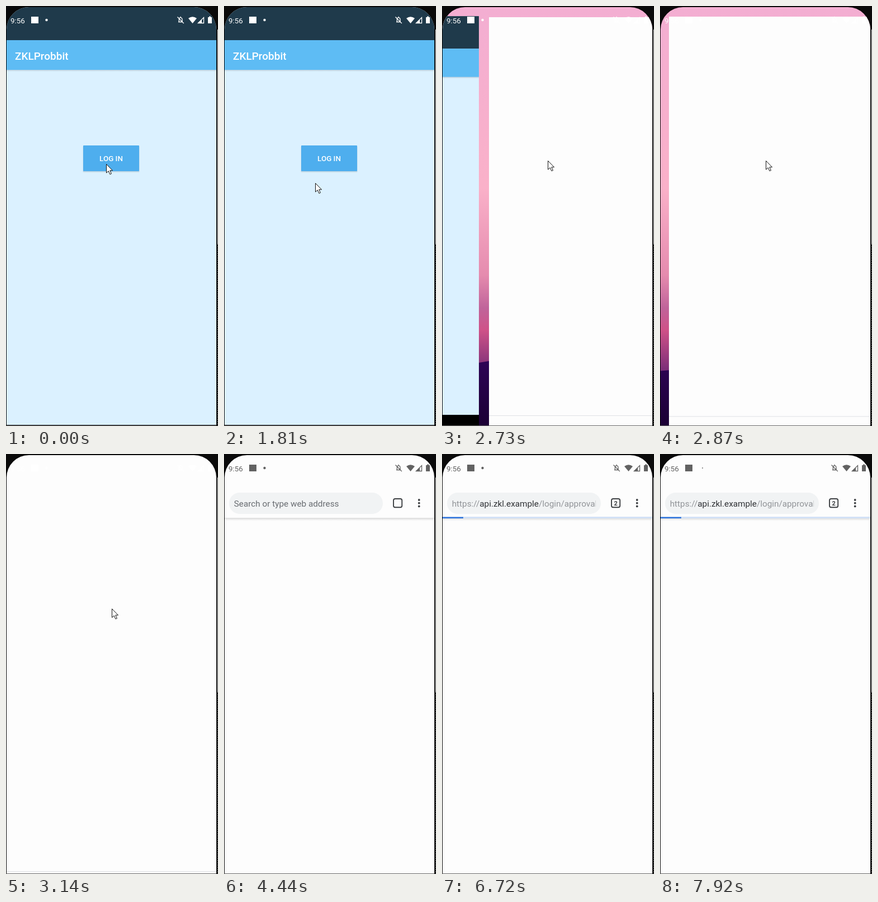
Recreate the animation shown at these times as an HTML page. Size 379 px wide and 750 px high, loop 8 s.

```html
<!DOCTYPE html>
<html lang="en">
<head>
<meta charset="utf-8">
<title>Log in</title>
<style>
  html, body { margin: 0; width: 100%; height: 100%; overflow: hidden; background: #000; }
  svg { display: block; width: 100vw; height: 100vh; font-family: Roboto, sans-serif; }
  .medium { font-weight: 500; fill: #fff; }
</style>
</head>
<body>
<svg viewBox="0 0 379 750" preserveAspectRatio="none">
  <defs>
    <clipPath id="phone"><path d="M1 749V42A40 40 0 0 1 41 2H336A40 40 0 0 1 376 42V749Z"/></clipPath>
    <clipPath id="field"><rect x="9" y="69" width="266" height="38"/></clipPath>
    <linearGradient id="sky" gradientUnits="userSpaceOnUse" x1="0" y1="0" x2="0" y2="650">
      <stop offset="0" stop-color="#f3aed2"/>
      <stop offset=".5" stop-color="#fab1c9"/>
      <stop offset=".74" stop-color="#e58bae"/>
      <stop offset=".83" stop-color="#c0649a"/>
      <stop offset=".89" stop-color="#cf5288"/>
      <stop offset="1" stop-color="#7c2f78"/>
    </linearGradient>
    <linearGradient id="ground" x1="0" y1="0" x2="0" y2="1">
      <stop offset="0" stop-color="#30045a"/>
      <stop offset="1" stop-color="#1b0034"/>
    </linearGradient>
    <linearGradient id="shade" x1="0" y1="0" x2="0" y2="1">
      <stop offset="0" stop-color="#000" stop-opacity=".14"/>
      <stop offset="1" stop-color="#000" stop-opacity=".01"/>
    </linearGradient>
  </defs>

  <rect width="379" height="750" fill="#0a0a0a"/>
  <path d="M378.500 42V425" stroke="#e4e4e4"/>
  <path d="M378.500 425V750" stroke="#777" stroke-dasharray="2 2"/>
  <rect y="749" width="376" height="1" fill="#666"/>

  <g clip-path="url(#phone)">
    <g id="wall">
      <rect width="377" height="750" fill="url(#sky)"/>
      <path d="M0 651.500L20 650L66 637L84 634L377 620V750H0Z" fill="url(#ground)"/>
      <rect id="gap" y="730" width="66" height="20" fill="#000"/>
    </g>

    <g id="app">
      <rect width="376" height="748" fill="#dbf1ff"/>
      <rect y="748" width="376" height="1" fill="#0a0a0a"/>
      <rect width="376" height="61" fill="#1f3a4b"/>
      <rect y="61" width="376" height="53" fill="#5ebcf4"/>
      <rect y="114" width="376" height="3" fill="url(#shade)"/>
      <text class="medium" x="16" y="95.500" font-size="19">ZKLProbbit</text>
      <rect x="137.500" y="250" width="101" height="47" rx="1.500" opacity=".1"/>
      <rect x="138" y="249" width="100" height="46" rx="1" fill="#4eaeee"/>
      <text class="medium" x="188" y="277.300" font-size="13.400" text-anchor="middle">LOG IN</text>
    </g>

    <g id="page">
      <rect id="sheet" width="377" height="750" fill="#fdfdfd"/>
      <rect id="rule" width="377" height="1" fill="#dfe2e5"/>
    </g>

    <g id="bar">
      <rect y="114" width="376" height="5" fill="url(#shade)"/>
      <rect x="9" y="69" width="275" height="38" rx="19" fill="#f1f3f4"/>
      <g clip-path="url(#field)" font-size="15.300">
        <text id="hint" x="17.700" y="94" fill="#686c71">Search or type web address</text>
        <text id="link" x="17.700" y="94" fill="#919498">https://<tspan fill="#303236">api.zkl.example</tspan>/login/approval</text>
      </g>
      <rect x="303" y="80" width="15.200" height="15.200" rx="3" fill="none" stroke="#3d4043" stroke-width="1.900"/>
      <text id="tabs" x="310.600" y="91.700" font-size="11" font-weight="700" text-anchor="middle" fill="#3d4043">2</text>
      <g fill="#3d4043">
        <circle cx="348.700" cy="82" r="1.900"/><circle cx="348.700" cy="87.700" r="1.900"/><circle cx="348.700" cy="93.400" r="1.900"/>
      </g>
      <g id="load">
        <rect y="112" width="376" height="3" fill="#d2e1f6"/>
        <rect y="112.500" width="38" height="2.500" fill="#2f74dc"/>
      </g>
    </g>

    <g id="status">
      <text x="8" y="30.500" font-size="13.400">9:56</text>
      <rect x="45" y="19" width="13" height="12"/>
      <circle id="dot"/>
      <g fill="none" stroke="currentColor" stroke-width="1.300">
        <path d="M308 28.500H316M309.300 28V24.500Q309.300 21 312 20.700Q315 21 315 24.500V28M312 18.800V20.500M306.500 19.500L317.800 31"/>
        <path d="M343.500 30.500L353.500 20.500V30.500Z"/>
      </g>
      <path d="M326 22Q333.500 16.500 341 22L333.500 31Z"/>
      <path d="M343 31L350 24V31Z"/>
      <path d="M361 20H363V18.500H366V20H368V31H361Z"/>
    </g>
  </g>

  <path id="cursor" d="M.5.500V16L4.200 12.700L6.900 18.600L9.400 17.500L6.800 11.800H11.500Z" fill="#fff" stroke="#111" stroke-linejoin="round"/>
</svg>
<script>
const LOOP = 8000;
const el = id => document.getElementById(id);
const set = (id, attrs) => {
  for (const key in attrs) el(id).setAttribute(key, attrs[key]);
};
const show = (id, on) => set(id, { visibility: on ? 'visible' : 'hidden' });

// Each row: start time, then the values held from there.
const pointer = [
  [0, 179, 282], [120, 177, 276], [270, 179, 270], [400, 181, 266],
  [1810, 163, 316], [1930, 139, 381], [2080, 132, 432], [2200, 179, 361],
  [2350, 194, 302], [2480, 189, 276]
];
const slide = [[0, 377, 20, 731], [2730, 84, 20, 731], [2870, 16, 19, 732.5], [2990, 1, 4, 745], [3140, 0, 0, 745]];
const fade = [[0, 0], [3810, .25], [3930, .55], [4050, .85], [4190, 1]];

const held = (rows, t) => rows.filter(row => row[0] <= t).pop().slice(1);

function render(t) {
  const moving = t >= 2730;
  const loaded = t >= 6600;
  const [px, py] = held(pointer, t);
  const [x, top, line] = held(slide, t);
  const [alpha] = held(fade, t);

  show('wall', moving && t < 3140);
  show('gap', moving && t < 2870);
  show('app', t < 2870);
  set('app', { transform: moving ? 'translate(-292 18.1) scale(.952)' : '' });

  show('page', moving);
  set('sheet', { x, y: top });
  set('rule', { x, y: line, opacity: 1 - alpha });

  set('bar', { opacity: alpha });
  show('hint', !loaded);
  show('link', loaded);
  show('tabs', loaded);
  show('load', t >= 6720);

  const ink = t >= 4440 ? '#626262' : '#fff';
  set('status', { fill: ink, color: ink });
  set('dot', t >= 7920 ? { cx: 76, cy: 25, r: .9 } : { cx: 72.5, cy: 25, r: 2.2 });

  show('cursor', t < 3810);
  set('cursor', { transform: `translate(${px} ${py})` });
}

const start = performance.now();
function tick() {
  render((performance.now() - start) % LOOP);
  requestAnimationFrame(tick);
}
tick();
</script>
</body>
</html>
```
